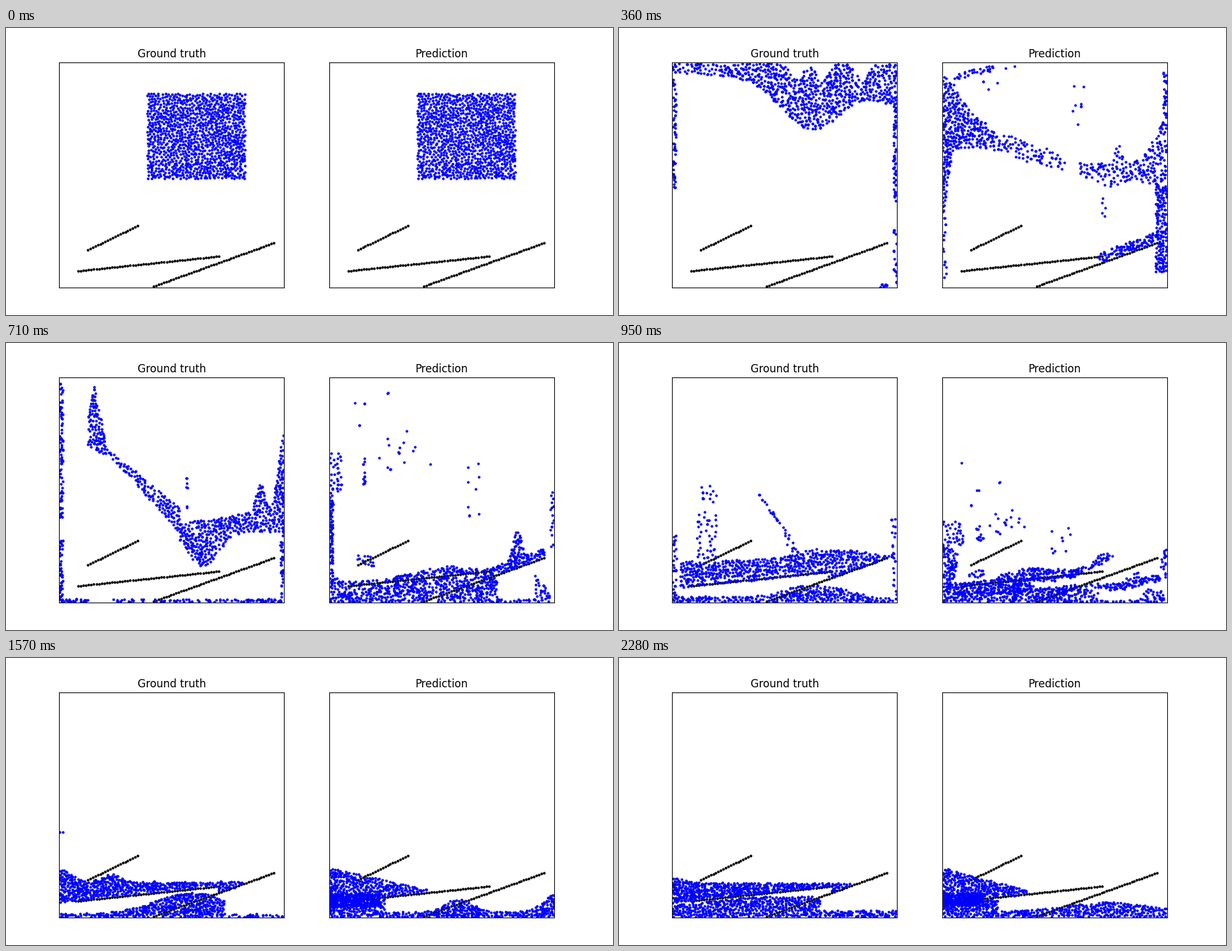
A matplotlib script for the animation above (2.31 s loop, 950 by 450 pixels).

```python
import numpy as np
import matplotlib.pyplot as plt
from matplotlib.animation import FuncAnimation

W, H, DPI = 950, 450, 100
SIDE = 352.27                     # edge length of a panel
LEFT, TOP = 83, 54.36
RIGHT, FLOOR = LEFT + SIDE, TOP + SIDE
SHIFT = 1.2 * SIDE                # distance between the panels
N = 1100                          # water particles per panel
rng = np.random.default_rng(7)


# --- ramps ------------------------------------------------------------

def line(x0, y0, x1, y1, n):
    return np.column_stack([np.linspace(x0, x1, n), np.linspace(y0, y1, n)])


RAMPS = np.vstack([
    line(128, 348, 206, 310, 21),
    line(113, 381, 333, 358, 55),
    line(231, 405, 419, 337, 49),
])


def slope(x):
    """The steep ramp on the right."""
    return 405 - 0.362 * (x - 231)


def bed(x):
    """Ground that the upper layer of water rests on."""
    return np.where(x < 333, 381 - 0.1045 * (x - 113), slope(x))


def bump(x, centre, width):
    return np.exp(-((x - centre) / width) ** 2)


# --- regions of water -------------------------------------------------

def band(count, x0, x1, top, bottom=lambda x: FLOOR - 1, tries=5):
    """Candidates between two curves, a few for each particle."""
    x = np.linspace(x0, x1, 500)
    hi, lo = top(x) + 0 * x, bottom(x) + 0 * x
    weight = np.maximum(lo - hi, 0.1)
    pick = rng.choice(500, count * tries, p=weight / weight.sum())
    y = hi[pick] + rng.random(count * tries) * (lo - hi)[pick]
    return np.column_stack([x[pick], y]).reshape(count, tries, 2)


def box(count, x0, x1, y0, y1, tries=5):
    return band(count, x0, x1, lambda x: y0, lambda x: y1, tries)


def left_wall(count, y0, y1):
    return box(count, LEFT + 1, LEFT + 6, y0, y1, 2)


def right_wall(count, y0, y1):
    return box(count, RIGHT - 6, RIGHT - 1, y0, y1, 2)


def puddle(count, x0, x1, depth=5):
    return box(count, x0, x1, FLOOR - depth, FLOOR - 1, 2)


def fill(parts):
    """Spread particles evenly over the parts, away from the ramps."""
    first = n = len(RAMPS)
    pts = np.empty((first + N, 2))
    pts[:n] = RAMPS
    for part in parts:
        for options in part:
            gap = options[:, None] - pts[None, :n]
            dist = np.einsum("ijk,ijk->ij", gap, gap).min(1)
            pts[n] = options[dist.argmax()]
            n += 1
    spare = first + N - n
    twins = rng.integers(first, n, spare)
    pts[n:] = pts[twins] + rng.normal(0, 0.6, (spare, 2))
    return pts[first:]


# --- shared start: the block flies up against the lid -----------------

block = fill([box(N, 221, 374, 103, 236, 12)])
lifted = block - (0, 36)
squashed = fill([band(900, 120, 434, lambda x: TOP + 1,
                      lambda x: 62 + 106 * bump(x, 298, 88) ** 2)])


# --- left panel -------------------------------------------------------

def hanging():
    return [
        band(620, 84, 434,
             lambda x: 56 + 25 * sum(bump(x, c, 13) for c in (278, 318, 380)),
             lambda x: (70 + 0.05 * (x - 84) + 78 * bump(x, 303, 68)
                        + 28 * bump(x, 425, 40))),
        left_wall(45, 80, 258), right_wall(45, 110, 275),
        right_wall(12, 310, FLOOR), puddle(8, 408, 420),
    ]


def falling():
    return [
        band(95, 128, 158, lambda x: 66 + 5 * abs(x - 138),
             lambda x: 162 + 0.5 * (x - 128)),
        band(115, 158, 272, lambda x: 165 + 0.83 * (x - 158),
             lambda x: 172 + 1.1 * (x - 158)),
        band(420, 272, 434,
             lambda x: (280 - 0.15 * (x - 290) - 45 * bump(x, 398, 9)
                        - 140 * bump(x, 440, 16)),
             lambda x: 296 + 55 * bump(x, 308, 32)),
        box(6, 282, 284, 211, 262, 3),
        left_wall(70, 62, 275), left_wall(35, 310, 400),
        right_wall(32, 290, 400),
        puddle(22, 84, 130), puddle(14, 168, 215), puddle(62, 228, 434),
    ]


def landing():
    return [
        band(520, 95, 432, lambda x: 340 - 20 * bump(x, 350, 90), bed),
        band(260, 84, 434, lambda x: 398 - 22 * bump(x, 310, 60)),
        band(26, 218, 290, lambda x: 236 + 1.3 * (x - 218),
             lambda x: 238 + 1.5 * (x - 218)),
        box(45, 122, 150, 225, 335),
        left_wall(24, 290, 400), right_wall(20, 260, 400),
    ]


def pouring():
    def jet(x):
        d = x - 121
        return 158 + 0.8 * d + 58 * (d / 149) ** 8

    return [
        band(34, 121, 270, jet,
             lambda x: jet(x) + 0.5 + 10 * ((x - 121) / 149) ** 2),
        band(460, 100, 392, lambda x: 342 + 18 * bump(x, 100, 12), bed),
        band(360, 84, 350, lambda x: 393 - 25 * bump(x, 330, 75)),
        puddle(12, 352, 432),
    ]


def spreading():
    return [
        left_wall(2, 266, 277),
        band(450, 84, 385, lambda x: (351 - 20 * bump(x, 84, 25)
                                      - 13 * bump(x, 165, 18)), bed),
        band(360, 84, 342, lambda x: 401 - 33 * bump(x, 290, 80)),
        puddle(24, 342, 433),
    ]


def calming(crest, height, shore, tip, depth, drips):
    """Late water: one layer on the ramps, one below, drips to the right."""
    return [
        band(430, 84, tip, lambda x: 353 - height * bump(x, crest, 25), bed),
        band(440, 84, shore, lambda x: np.maximum(bed(x), 371) + 3),
        puddle(drips, shore, 434, depth),
    ]


# --- right panel, in the coordinates of the left one ------------------

def rolling():
    return [
        band(230, 84, 152, lambda x: 152 - 77 * bump(x, 84, 38),
             lambda x: 187 + 18 * bump(x, 84, 15)),
        band(26, 103, 162, lambda x: 72 - 0.25 * (x - 103),
             lambda x: 82 - 0.25 * (x - 103), 2),
        band(90, 152, 277, lambda x: 156 + 0.35 * (x - 152),
             lambda x: 187 + 0.35 * (x - 152), 2),
        band(190, 297, 434,
             lambda x: (212 - 30 * bump(x, 359, 8) - 75 * bump(x, 440, 32)),
             lambda x: 230 + 18 * bump(x, 345, 30) + 25 * bump(x, 434, 40), 3),
        box(130, 417, 434, 248, 383), right_wall(22, 68, 140),
        band(80, 327, 422, lambda x: slope(x) - 18, slope, 3),
        band(45, 84, 99, lambda x: 188, lambda x: 292 - 6.8 * (x - 84)),
        left_wall(12, 290, 392),
        box(7, 287, 305, 85, 155, 2), box(5, 333, 338, 255, 305, 2),
        box(6, 100, 200, 58, 98, 2),
    ]


def crashing():
    return [
        box(13, 160, 242, 135, 200, 2), box(8, 300, 320, 185, 290, 2),
        box(4, 112, 285, 62, 140, 2), box(8, 136, 139, 180, 224),
        box(28, 84, 103, 172, 232, 2), left_wall(65, 232, 345),
        band(540, 84, 345, lambda x: (374 - 24 * bump(x, 275, 85)
                                      - 25 * bump(x, 84, 10)), tries=3),
        band(125, 322, 420,
             lambda x: slope(x) - 15 - 45 * bump(x, 377, 8), slope, 3),
        box(13, 125, 153, 333, 349), right_wall(15, 233, 330),
        band(28, 405, 434, lambda x: 362 + 1.3 * (x - 405)),
        puddle(18, 345, 405),
    ]


def piling():
    return [
        box(1, 101, 101, 287, 287),
        box(310, 84, 189, 347, FLOOR - 1, 3), box(200, 97, 189, 370, 390, 2),
        band(130, 189, 327, lambda x: 353, bed),
        band(290, 189, 434, lambda x: (384 + 12 * bump(x, 340, 45)
                                       - 17 * bump(x, 440, 20))),
    ]


def leaning(reach, core, shore):
    """Late water: a heap with a dense core at the wall, a pool beside it."""
    return [
        band(450, 84, reach,
             lambda x: 329 + 35 * (x - 84) / (reach - 84),
             lambda x: np.where(x < 170, FLOOR - 1, bed(x) + 2), 4),
        box(230, 84, core, 369, 389, 2),
        band(290, 170, 434, shore, tries=4),
    ]


# --- motion -----------------------------------------------------------

def match(a, b):
    """Reorder b so that the particles of a travel short ways to it."""
    out = np.empty_like(b)
    out[a[:, 0].argsort()] = b[b[:, 0].argsort()]
    half = N // 2
    for _ in range(2200):
        p = rng.permutation(N)
        i, j = p[:half], p[half:]
        swap = ((a[i] - a[j]) * (out[i] - out[j])).sum(1) < 0
        i, j = i[swap], j[swap]
        out[i], out[j] = out[j], out[i]
    return out


class Flow:
    """Smooth paths through key poses that never overshoot."""

    def __init__(self, times, poses):
        self.t = np.array(times, float)
        path = [block, lifted]
        for pose in [squashed] + [fill(parts) for parts in poses]:
            path.append(match(path[-1], pose))
        self.p = np.array(path)
        d = np.diff(self.p, axis=0) / np.diff(self.t)[:, None, None]
        a, b = d[:-1], d[1:]
        same = a * b > 0
        mid = np.where(same, 2 * a * b / np.where(same, a + b, 1), 0)
        self.v = np.concatenate([d[:1], mid, d[-1:]])

    def at(self, t):
        k = min(np.searchsorted(self.t, t, "right"), len(self.t) - 1) - 1
        h = self.t[k + 1] - self.t[k]
        s = (t - self.t[k]) / h
        ease = s * s * (3 - 2 * s)
        return (self.p[k] * (1 - ease) + self.p[k + 1] * ease
                + h * s * (1 - s) ** 2 * self.v[k]
                - h * s * s * (1 - s) * self.v[k + 1])


truth = Flow([0, 2, 5, 12, 23, 30, 39, 51, 59, 74], [
    hanging(), falling(), landing(), pouring(), spreading(),
    calming(140, 14, 336, 382, 7, 42),
    calming(84, 9, 314, 370, 11, 90),
])
guess = Flow([0, 2, 5, 12, 23, 39, 51, 59, 74], [
    rolling(), crashing(), piling(),
    leaning(239, 162, lambda x: (398 - 20 * bump(x, 285, 30)
                                 - 28 * bump(x, 440, 30))),
    leaning(217, 149, lambda x: (397 - 17 * bump(x, 295, 30)
                                 - 20 * bump(x, 440, 35))),
    leaning(215, 147, lambda x: 397 - 14 * bump(x, 340, 90)),
])

# --- stage ------------------------------------------------------------

fig = plt.figure(figsize=(W / DPI, H / DPI), dpi=DPI, facecolor="white")


def panel(title, shift):
    ax = fig.add_axes([(LEFT + shift) / W, 1 - FLOOR / H, SIDE / W, SIDE / H])
    ax.set(xlim=(LEFT, RIGHT), ylim=(FLOOR, TOP), xticks=[], yticks=[])
    ax.set_title(title, fontsize=12, family="DejaVu Sans")
    ax.plot(*RAMPS.T, "o", ms=2, color="black")
    return ax.plot([], [], "o", ms=2, color="blue")[0]


water = [(panel("Ground truth", 0), truth),
         (panel("Prediction", SHIFT), guess)]

# Each step lasts 30 ms, three of them 50 ms; the clock ticks every 10 ms.
ticks = np.full(75, 3)
ticks[18::21] = 5
steps = np.repeat(np.arange(75), ticks)


def draw(tick):
    for dots, flow in water:
        dots.set_data(*flow.at(steps[tick]).T)
    return [dots for dots, _ in water]


anim = FuncAnimation(fig, draw, frames=len(steps), interval=10,
                     repeat=True, repeat_delay=0, blit=False)
plt.show()
```
